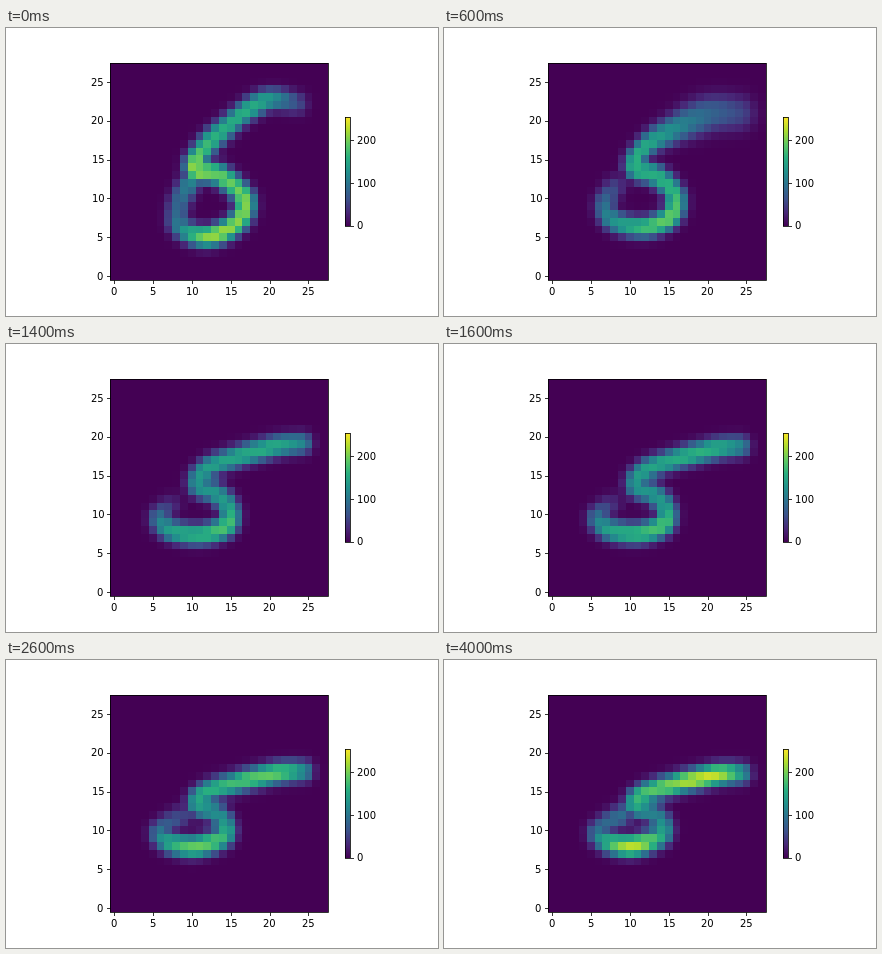
These frames come from a looping animation (432x288 px, 4.2 s). An HTML page with a canvas:

```html
<!DOCTYPE html>
<html lang="en">
<head>
<meta charset="utf-8">
<title>Digit morph heatmap</title>
<style>
html, body { margin: 0; width: 100%; height: 100%; overflow: hidden; background: #fff; }
canvas { display: block; }
</style>
</head>
<body>
<canvas id="stage" width="432" height="288"></canvas>
<script>
const ctx = document.getElementById('stage').getContext('2d');
const LOOP = 4200, STEP = 200, N = 28;
const LEFT = 104.4, TOP = 34.56, CELL = 217.44 / N;
const VIRIDIS = ['440154', '482878', '3b528b', '2c718e', '21918c', '28ae80', '5ec962', 'addc30', 'fde725']
  .map(h => [0, 2, 4].map(i => parseInt(h.substr(i, 2), 16)));

// Pen strokes from the upper tip to the lower left: x, y, intensity
const six = [[23.5, 22.2, .22], [19, 22.4, .58], [12.4, 17.3, .66], [10.4, 13.8, .85],
  [13.5, 13, .75], [16.7, 10, .8], [15.8, 6.9, .82], [12, 5.1, .82],
  [8.6, 6.3, .45], [8.3, 9, .33], [9.7, 12, .45]];
const five = [[24, 20.1, .45], [19.8, 19.4, .56], [12.5, 16.8, .54], [10.8, 14.1, .5],
  [13.2, 12.9, .54], [15.1, 10.8, .58], [14.9, 8.3, .72], [12, 7.1, .6],
  [7.8, 7.5, .56], [5.8, 9.3, .38], [7, 11.2, .03]];
const flat = [[24.3, 17.3, .5], [20.5, 17, .92], [12.6, 15, .72], [10.7, 13.3, .62],
  [13, 12.2, .44], [14.1, 10.8, .5], [13.8, 9.2, .62], [10.3, 8, .9],
  [7, 8.6, .6], [6, 10, .36], [9, 12, .36]];

const lerp = (a, b, k) => a + (b - a) * k;

function color(v) {
  const p = Math.min(Math.max(v, 0), 1) * 8, i = Math.min(Math.floor(p), 7);
  return `rgb(${VIRIDIS[i].map((c, j) => Math.round(lerp(c, VIRIDIS[i + 1][j], p - i)))})`;
}

// The six turns into a five at a steady pace, which then settles with an ease-out.
// On the way to the five, the tip spreads and dims.
function strokeAt(t) {
  const first = t < 1000;
  const [a, b] = first ? [six, five] : [five, flat];
  const k = first ? t / 1000 : (t - 1000) / 3000;
  const move = first ? k : 1 - (1 - k) ** 3;
  return a.map(([x, y, v], i) => {
    const blur = first && i < 2 ? Math.sin(Math.PI * k) : 0;
    const [bx, by, bv] = b[i];
    return [lerp(x, bx, move), lerp(y, by, move), lerp(v, bv, k) * (1 - .4 * blur), 1.42 + .9 * blur];
  });
}

// Catmull-Rom sampling
function sample(points, per = 12) {
  const last = points.length - 1, out = [points[last]];
  const at = i => points[Math.min(Math.max(i, 0), last)];
  for (let s = 0; s < last * per; s++) {
    const i = Math.floor(s / per), u = s / per - i;
    const [a, b, c, d] = [at(i - 1), at(i), at(i + 1), at(i + 2)];
    out.push(b.map((v, n) => v + u / 2 * (c[n] - a[n] +
      u * (2 * a[n] - 5 * v + 4 * c[n] - d[n] + u * (3 * (v - c[n]) + d[n] - a[n])))));
  }
  return out;
}

const intensity = (x, y, pen) => Math.max(...pen.map(([px, py, v, width]) =>
  v * Math.exp(-((Math.hypot(x - px, y - py) / width) ** 2.5))));

function line(x1, y1, x2, y2) {
  ctx.beginPath();
  ctx.moveTo(x1, y1);
  ctx.lineTo(x2, y2);
  ctx.stroke();
}

// Aligns by inked width and starts on a whole pixel; align: 0 left, .5 centre, 1 right
function label(text, x, y, align) {
  const m = ctx.measureText(text);
  const ink = m.actualBoundingBoxRight + m.actualBoundingBoxLeft;
  ctx.fillText(text, Math.round(x - ink * align), Math.round(y));
}

function drawAxes() {
  ctx.strokeStyle = ctx.fillStyle = '#000';
  ctx.lineWidth = .8;
  ctx.font = '10px "DejaVu Sans", sans-serif';
  ctx.strokeRect(104.5, 35.5, 218, 217);
  ctx.strokeRect(339.5, 89.5, 5, 109);
  for (let n = 0; n <= 25; n += 5) {
    const x = LEFT + (n + .5) * CELL, y = TOP + (N - n - .5) * CELL;
    const px = Math.round(x) + .5, py = Math.round(y) + .5;
    line(px, 252.5, px, 256);
    line(101, py, 104.5, py);
    label(n, x, 267, .5);
    label(n, 97.4, y + 3.6, 1);
  }
  for (let n = 0; n <= 200; n += 100) {
    const y = 197.64 - n * 108.72 / 255, py = Math.round(y) + .5;
    line(344.5, py, 348, py);
    label(n, 351, y + 3.6, 0);
  }
}

function draw(t) {
  ctx.fillStyle = '#fff';
  ctx.fillRect(0, 0, 432, 288);
  const size = 218 / N, pen = sample(strokeAt(t));
  const colX = c => 104 + Math.ceil(c * size - .5), rowY = r => 34 + Math.round(r * size);
  ctx.save();
  ctx.beginPath();
  ctx.rect(104, 35, 218, 217);
  ctx.clip();
  for (let r = 0; r < N; r++) {
    for (let c = 0; c < N; c++) {
      ctx.fillStyle = color(intensity(c, N - 1 - r, pen));
      ctx.fillRect(colX(c), rowY(r), colX(c + 1) - colX(c), rowY(r + 1) - rowY(r));
    }
  }
  ctx.restore();
  for (let y = 89; y < 198; y++) {
    ctx.fillStyle = color((197.5 - y) / 109);
    ctx.fillRect(339, y, 5, 1);
  }
  drawAxes();
}

const start = performance.now();
let shown = -1;
function tick() {
  const step = Math.floor(((performance.now() - start) % LOOP) / STEP);
  if (step !== shown) draw((shown = step) * STEP);
  requestAnimationFrame(tick);
}
tick();
</script>
</body>
</html>
```
